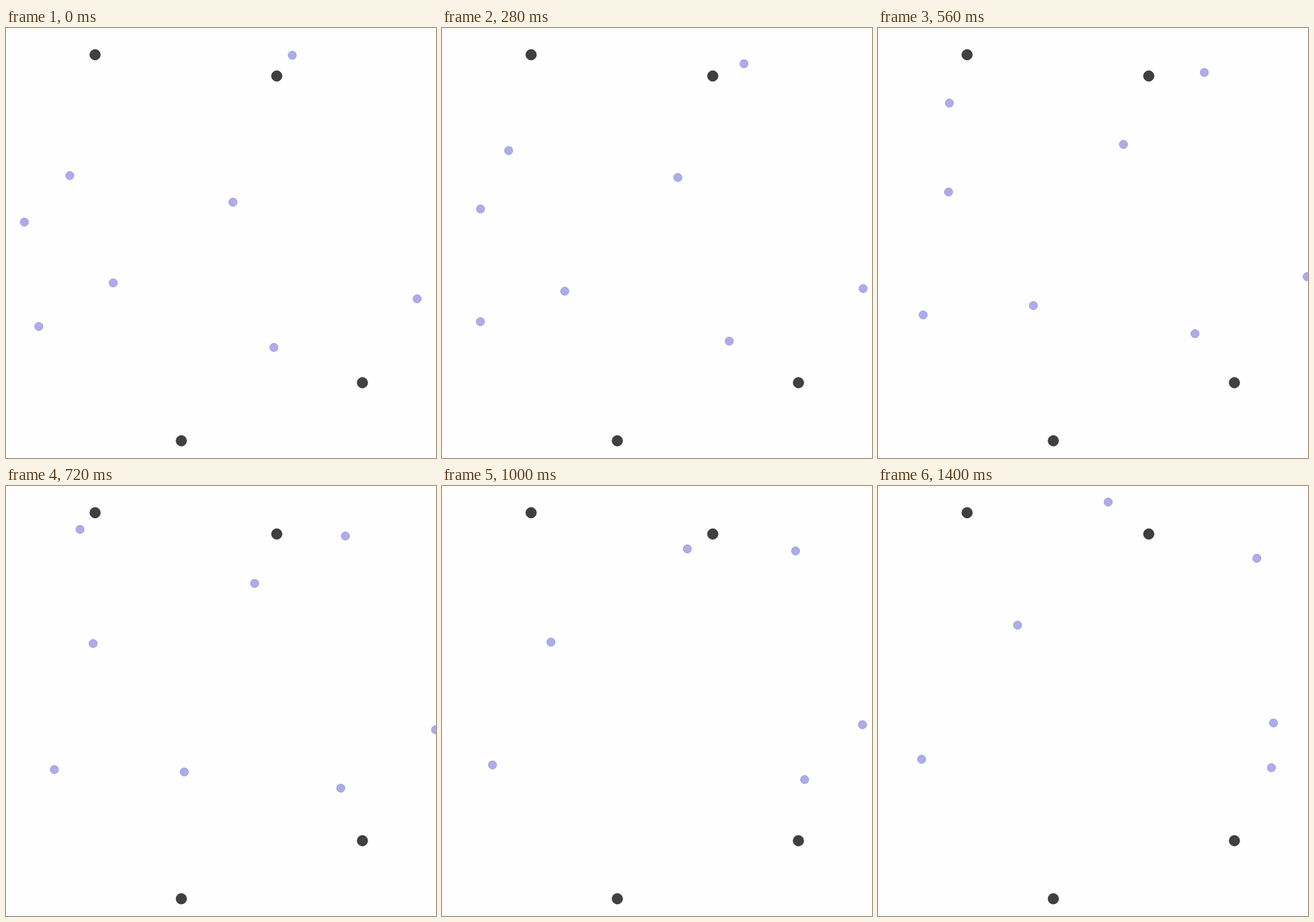
Write an HTML page that moves like this. It is 748 by 748 pixels and loops after 1.44 s.

```html
<!DOCTYPE html>
<html lang="en">
<head>
<meta charset="utf-8">
<title>Drifting particles</title>
<style>
  html, body { margin: 0; width: 100%; height: 100%; overflow: hidden; background: #fefefe; }
  svg { display: block; width: 100vw; height: 100vh; }
  .fixed { fill: #404040; stroke: #383838; }
  .moving { fill: #acaceb; stroke: #9a9acf; }
</style>
</head>
<body>
<svg id="stage" viewBox="0 0 748 748"></svg>
<script>
const LOOP = 1440, STEP = 40;
const times = [0, 160, 400, 720, 1000, 1240, 1400];
const anchors = [[155, 46.5], [471, 83.5], [620, 617], [305, 718]];

// Waypoints at the shared times; `end` is when a particle is removed.
const particles = [
  { x: [498, 510, 543, 590.3, 615, 639.7, 659], y: [47.5, 55.3, 69.3, 87, 113, 125, 125.7] },
  { x: [111, 113, 119.5, 128.7, 136], y: [256.7, 239.2, 180.3, 75.5, -27], end: 1000 },
  { x: [394.8, 402.6, 417.8, 432.5, 426.8, 412, 400.4], y: [303, 282.6, 234.8, 169.4, 109.4, 59.5, 28] },
  { x: [32, 46, 91.6, 151.6, 189.5, 221.6, 242.8], y: [337.7, 327.6, 301, 274, 271.6, 258, 242] },
  { x: [186.5, 197.4, 235, 310.1, 383], y: [443.4, 449, 468.5, 497.4, 521], end: 860 },
  { x: [466, 481.6, 520.9, 582.4, 630.8, 666.8, 684.4], y: [555.7, 551, 538, 525.6, 510.7, 496.3, 490] },
  { x: [715.2, 724, 740.4, 747.2, 731.5, 706.2, 688], y: [471, 462.6, 443.4, 424, 415.2, 413.2, 412.2] },
  { x: [57, 61.8, 72, 84, 87.8, 83.2, 75.9], y: [519.2, 515.5, 505.6, 493.2, 485.2, 480, 475.3] }
];

const stage = document.getElementById("stage");

function addDot(className, r) {
  const dot = document.createElementNS("http://www.w3.org/2000/svg", "circle");
  dot.setAttribute("class", className);
  dot.setAttribute("r", r);
  stage.appendChild(dot);
  return dot;
}

function place(dot, x, y) {
  dot.setAttribute("cx", x);
  dot.setAttribute("cy", y);
}

const slope = (v, i) => (v[i + 1] - v[i]) / (times[i + 1] - times[i]);

// Velocity at a waypoint: the parabola through its neighbours.
function velocity(v, i) {
  const last = v.length - 1;
  if (i === 0) return 1.5 * slope(v, 0) - 0.5 * velocity(v, 1);
  if (i === last) return 1.5 * slope(v, last - 1) - 0.5 * velocity(v, last - 1);
  const before = times[i] - times[i - 1], after = times[i + 1] - times[i];
  return (slope(v, i - 1) * after + slope(v, i) * before) / (before + after);
}

// Cubic Hermite interpolation through the waypoints.
function at(v, t) {
  let i = 0;
  while (i < v.length - 2 && t >= times[i + 1]) i++;
  const span = times[i + 1] - times[i];
  const u = (t - times[i]) / span, w = 1 - u;
  return w * w * ((1 + 2 * u) * v[i] + u * span * velocity(v, i)) +
         u * u * ((3 - 2 * u) * v[i + 1] - w * span * velocity(v, i + 1));
}

anchors.forEach(([x, y]) => place(addDot("fixed", 9.2), x, y));
particles.forEach(p => { p.dot = addDot("moving", 7.2); });

function draw() {
  const t = Math.floor(performance.now() % LOOP / STEP) * STEP;
  for (const p of particles) {
    const alive = t < (p.end ?? LOOP);
    p.dot.style.display = alive ? "" : "none";
    if (alive) place(p.dot, at(p.x, t), at(p.y, t));
  }
  requestAnimationFrame(draw);
}
draw();
</script>
</body>
</html>
```
